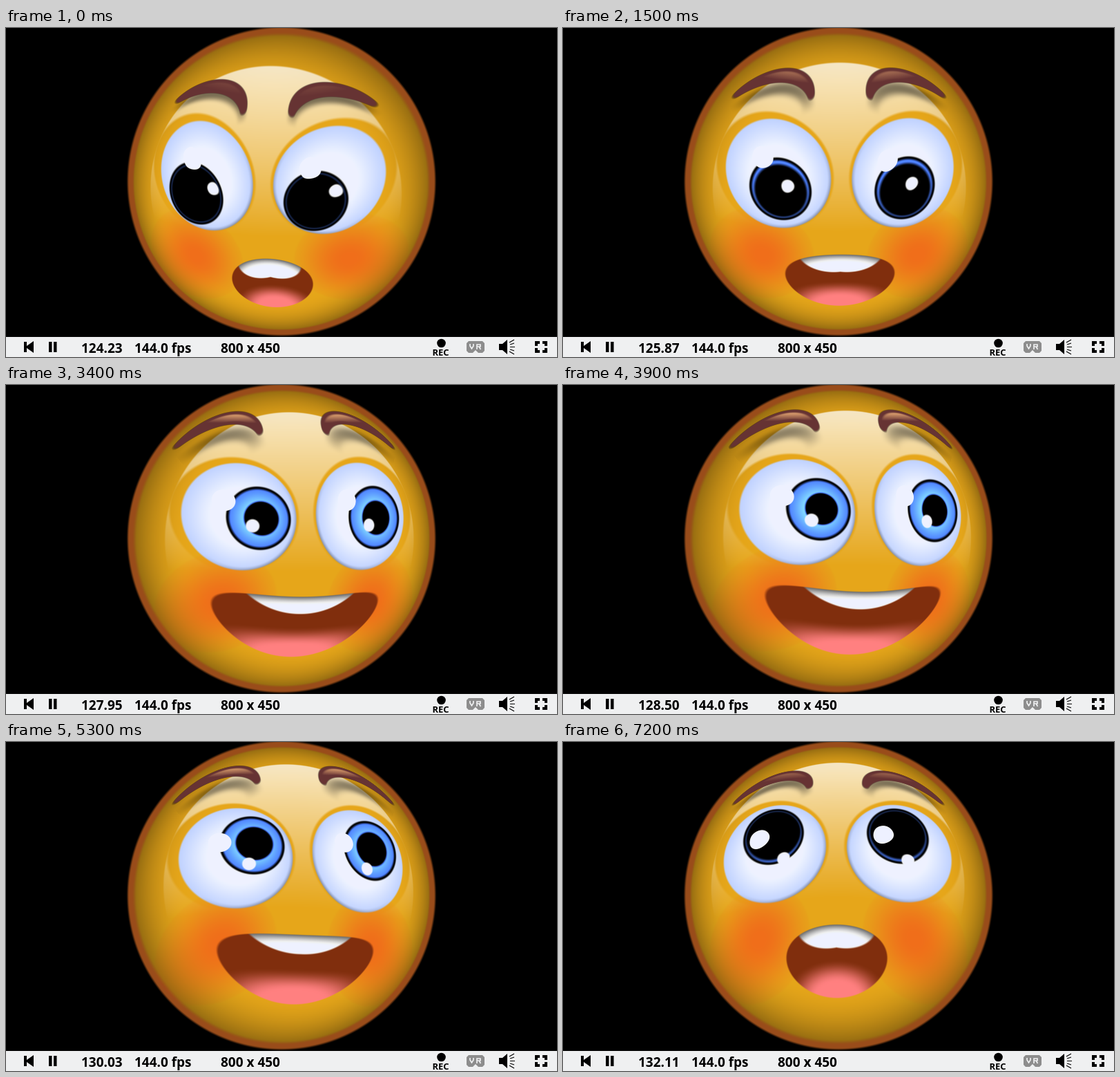
These frames come from a looping animation (798 px wide and 476 px high, 7300 ms). An HTML page with a canvas:

```html
<!DOCTYPE html>
<html lang="en">
<head>
<meta charset="utf-8">
<title>Smiley</title>
<style>
  html, body { margin: 0; width: 100%; height: 100%; overflow: hidden; background: #000; }
  canvas, svg { position: absolute; left: 0; }
  canvas { top: 0; }
  svg { top: 447px; font: bold 19px "Open Sans", "Noto Sans", sans-serif; }
</style>
</head>
<body>
<canvas id="stage" width="798" height="447"></canvas>
<svg width="798" height="29" viewBox="0 447 798 29">
  <path fill="#eff0f1" d="M0 447h798v29H0z"/>
  <path d="M26 454h4v6l10-7v17l-10-7v6h-4zM62 454h4.500v15H62zM69 454h4.500v15H69z"/>
  <text id="clock" x="109" y="470"></text>
  <text x="186" y="470">144.0 fps</text>
  <text x="311" y="470">800 x 450</text>
  <circle cx="630.500" cy="456" r="6.300"/>
  <text x="617.500" y="474" font-size="13">REC</text>
  <path fill="#8d8d8d" d="M670 453h20l3 3v11l-3 3h-6l-4-4-4 4h-6l-3-3v-11z"/>
  <path fill="none" stroke="#eff0f1" stroke-width="1.700" d="M672 457v3l2.500 4 2.500-4v-3M682 465v-7h5v3h-5M685 461l2.500 4"/>
  <path d="M714 457h5l7-6v21l-7-6h-5z"/>
  <path fill="none" stroke="#000" stroke-width="1.200" d="M729 455l7-4M730 458l6-2M730 461.500h7M730 465l6 2M729 468l7 4"/>
  <path d="M766 453h7v4h-3v3h-4zM784 453h-7v4h3v3h4zM766 470h7v-4h-3v-3h-4zM784 470h-7v-4h3v-3h4z"/>
</svg>
<script>
const FRAMES = 73, FRAME_MS = 100, START = 124.23, STEP = 0.10944;
const HEIGHT = 450, CX = 399, CY = 222;

const canvas = document.getElementById('stage');
const clock = document.getElementById('clock');
const ctx = canvas.getContext('2d');
const image = ctx.createImageData(canvas.width, canvas.height);
const data = image.data.fill(0);
for (let i = 3; i < data.length; i += 4) data[i] = 255;

const { hypot, sin, cos, abs, min } = Math;
const sat = v => v < 0 ? 0 : v > 1 ? 1 : v;
const lerp = (a, b, k) => a + (b - a) * k;
const ramp = (a, b, v) => sat((v - a) / (b - a));
const smooth = (a, b, v) => { const k = ramp(a, b, v); return k * k * (3 - 2 * k); };

const WHITE = [1, 1, 1], BLACK = [0, 0, 0];
const SKIN = [.9, .65, .1], RIM = [.6, .3, .1], BLUSH = [1, .1, .1];
const IRIS = [.3, .5, 1], LIPS = [.5, .18, .05], TONGUE = [1, .5, .5];
const BROW = [.4, .2, .2], BROW_SHINE = [1, .75, .5];

// Colours are blended in place.
function blend(col, other, k) {
  if (k > 0) for (let i = 0; i < 3; i++) col[i] += (other[i] - col[i]) * k;
}
function scale(col, k) {
  for (let i = 0; i < 3; i++) col[i] *= k;
  return col;
}

function head(col, x, y) {
  const d = hypot(x, y);
  scale(col, 1 - ramp(.35, .5, d) ** 2 * .5);
  blend(col, RIM, smooth(.47, .48, d));
  const shine = smooth(.41, .405, d) * lerp(.75, 0, ramp(.41, -.1, y));
  blend(col, WHITE, shine * smooth(.18, .19, hypot(x - .21, y - .08)));
  const c = hypot(x - .25, y + .2);
  blend(col, BLUSH, smooth(.2, .01, c) * .4 * smooth(.17, .16, c));
  scale(col, smooth(.5, .49, d));
}

function eye(under, x, y, side, pose) {
  const { mx, my, smile, time } = pose;
  x = (x - .5) * side;
  y -= .5;
  let d = hypot(x, y);
  const alpha = smooth(.5, .48, d);
  const col = [1, 1, 1];
  blend(col, IRIS, smooth(.1, .7, d) * .5);
  scale(col, 1 - smooth(.45, .5, d) * .5 * sat(-y - x * side));

  d = hypot(x - mx * .4, y - my * .4);
  blend(col, BLACK, smooth(.3, .28, d));
  const irisMask = smooth(.28, .25, d);
  blend(col, scale([...IRIS], 1 + smooth(.3, .05, d)), irisMask);

  const pupil = lerp(.4, .16, smile);
  d = hypot(x - mx * .45, y - my * .45);
  blend(col, BLACK, smooth(pupil, pupil * .85, d) * irisMask);

  const wobble = .01 * (1 - smile);
  const hx = x + sin(time * 3 + y * 25) * wobble;
  const hy = y + sin(time * 3 + x * 25) * wobble;
  blend(col, WHITE, smooth(.1, .09, hypot(hx + .15, hy - .15))
                  + smooth(.07, .05, hypot(hx - .08, hy + .08)));
  blend(under, col, alpha);
}

function mouth(under, x, y, smile) {
  x -= .5;
  y = (y - .5) * 1.5 - x * x * 2 * smile;
  x *= lerp(2.5, 1, smile);
  const d = hypot(x, y);
  const col = [...LIPS];
  const teeth = hypot(x, y + (abs(x) * .5 + .1) * (1 - smile) - .6);
  blend(col, scale([1, 1, 1], smooth(.6, .35, d)), smooth(.4, .37, teeth));
  blend(col, TONGUE, smooth(.5, .2, hypot(x, y + .5)));
  blend(under, col, smooth(.5, .48, d));
}

function crescent(x, y, blur) {
  return sat(smooth(.45, .45 - blur, hypot(x, y))
           - smooth(.5, .5 - blur, hypot(x - .07, y + .14)));
}

function brow(under, x, y, smile) {
  const offset = lerp(.2, 0, smile);
  const level = y + offset;
  y = level + x * lerp(.5, .8, smile) - lerp(.1, .3, smile) - .5;
  x -= lerp(0, .1, smile) + .5;

  const mask = crescent(x, y, .1);
  const col = [...BROW];
  blend(col, BROW_SHINE, ramp(.7, .8, level) * .75 * smooth(.6, .9, mask) * smile);

  const shadow = smooth(0, 1, crescent(x, y + .15 - offset * .5, .1 + .1 * smile)) * .5;
  const cover = smooth(.2, .4, mask);
  blend(under, scale(col, cover), lerp(shadow, 1, cover));
}

function shade(x, y, pose) {
  const pull = sat(.23 - x * x - y * y);
  x -= pose.mx * pull;
  y -= pose.my * pull;
  if (hypot(x, y) >= .5) return BLACK;
  const side = x < 0 ? -1 : 1;
  x = abs(x);
  const col = [...SKIN];
  head(col, x, y);
  if (hypot(x - .2, y - .075) < .175) eye(col, (x - .03) / .34, (y + .1) / .35, side, pose);
  if (hypot(x, y + .15) < .3) mouth(col, (x + .3) / .6, (y + .43) / .3, pose.smile);
  if (hypot(x - .185, y - .325) < .18) brow(col, (x - .03) / .37, (y - .2) / .25, pose.smile);
  if (col[2] > .9) {              // slightly muted whites
    col[0] = min(col[0], .935);
    col[1] = min(col[1], .945);
  }
  return col;
}

function draw(time) {
  const swing = sin(time * .5);
  const pose = { time, mx: swing * .4, my: cos(time * .38) * .4, smile: swing * .5 + .5 };
  for (let py = 0; py < canvas.height; py++) {
    for (let px = CX - 225; px < CX + 225; px++) {
      const col = shade((px + .5 - CX) / HEIGHT, (CY - py - .5) / HEIGHT, pose);
      const i = (py * canvas.width + px) * 4;
      for (let c = 0; c < 3; c++) data[i + c] = col[c] * 255;
    }
  }
  ctx.putImageData(image, 0, 0);
  clock.textContent = time.toFixed(2);
}

const begin = performance.now();
let shown = -1;
function tick() {
  const step = Math.floor((performance.now() - begin) / FRAME_MS) % FRAMES;
  if (step !== shown) draw(START + STEP * (shown = step));
  requestAnimationFrame(tick);
}
tick();
</script>
</body>
</html>
```
